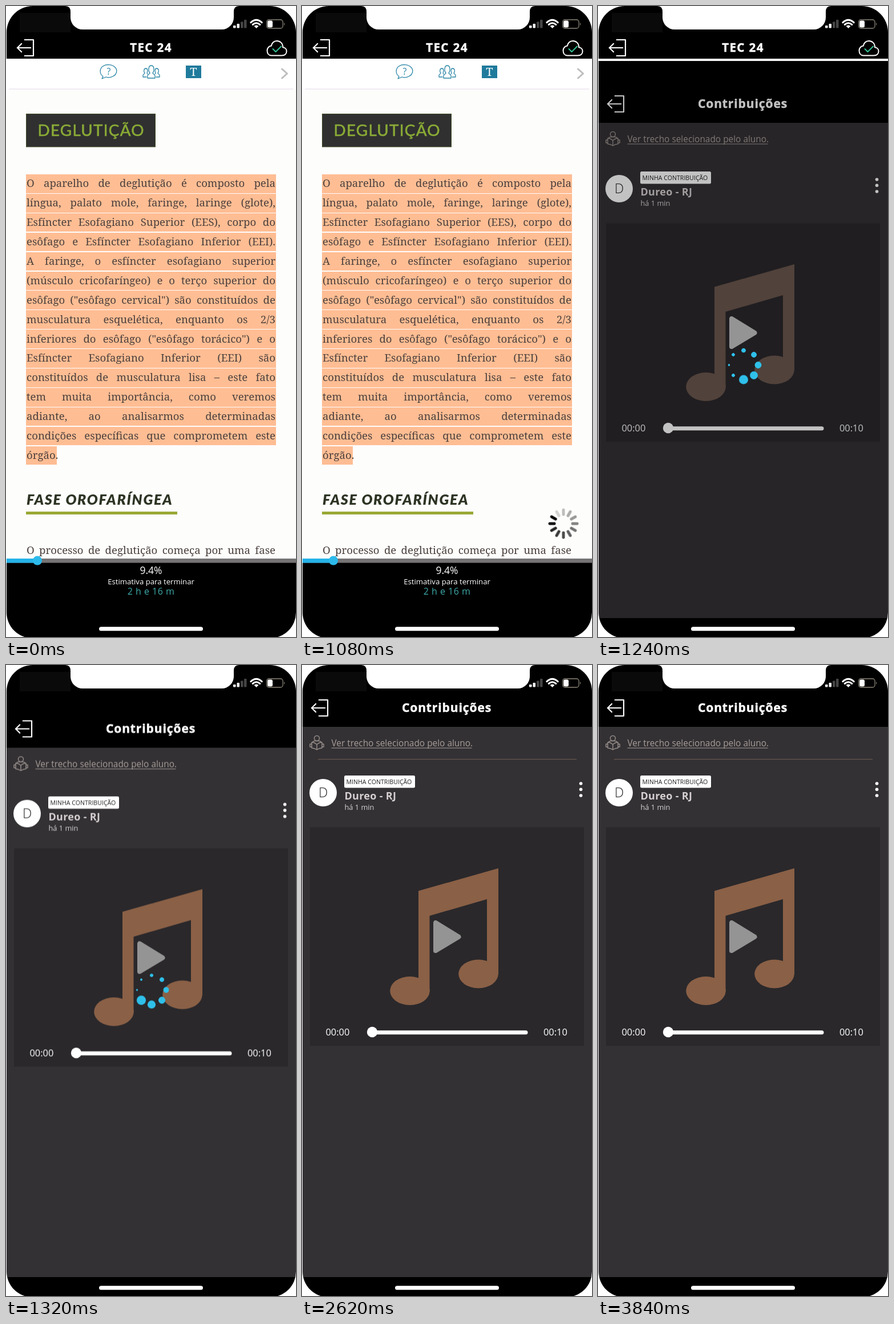
An HTML page for the animation above (3.86 s loop, 508 by 1102 pixels).

```html
<!DOCTYPE html>
<html lang="pt">
<head>
<meta charset="utf-8">
<title>Contribuições</title>
<style>
html, body { margin: 0; width: 100%; height: 100%; overflow: hidden; background: #fff; }
#stage { position: relative; width: 508px; height: 1102px; overflow: hidden; }
svg { position: absolute; left: 0; top: 0; font-family: "Open Sans", "Noto Sans", sans-serif; }
.mid { text-anchor: middle; }
.bold { font-weight: 700; }
.title { font-weight: 700; fill: #fff; stroke: #fff; stroke-width: .5; }
.lato { font-family: Lato, sans-serif; }
.line { fill: none; stroke-linecap: round; stroke-linejoin: round; }

#page { position: absolute; left: 0; top: 0; width: 508px; height: 965px; overflow: hidden; }
.row { position: absolute; left: 36px; width: 436px; height: 34px; line-height: 34px; white-space: nowrap;
  font-family: "Noto Serif", serif; font-size: 18.6px; color: #4b413e; text-align: justify; text-align-last: justify; }
.row.last { text-align-last: left; }
.mark { position: absolute; left: 35px; width: 438px; height: 32.7px; background: #ffbd93; }
.mark.last { width: 54px; }

#clip { position: absolute; left: 0; top: 0; width: 508px; height: 1069px; overflow: hidden; }
#panel { position: absolute; left: 0; top: 0; width: 508px; height: 1102px; animation: slide 3.86s infinite; }
#dim { animation: dim 3.86s linear infinite; }
#note { animation: tint 3.86s linear infinite; }
#rule { animation: rule 3.86s step-end infinite; }
#loader { animation: loader 3.86s step-end infinite; }
#wait { animation: wait 3.86s step-end infinite; }
.dot { animation: shrink .772s linear infinite; }
.spoke { animation: fade .965s steps(12) infinite; }

/* The panel moves in 20 ms steps. */
@keyframes slide {
  0%, 28.49% { transform: translateY(1102px); animation-timing-function: steps(3); }
  30.04% { transform: translateY(254px); animation-timing-function: steps(4); }
  32.12% { transform: translateY(96px); animation-timing-function: steps(4); }
  34.19% { transform: translateY(36.5px); animation-timing-function: steps(7); }
  37.8%, 100% { transform: none; }
}
@keyframes dim { 0%, 31% { opacity: .42; } 33.7%, 100% { opacity: 0; } }
@keyframes tint { 0%, 31% { fill: #534f52; } 33.7%, 100% { fill: #8a6046; } }
@keyframes rule { 0% { opacity: 0; } 38.3%, 100% { opacity: 1; } }
@keyframes loader { 0% { opacity: 1; } 38.3%, 100% { opacity: 0; } }
@keyframes wait { 0% { opacity: 0; } 10.4%, 100% { opacity: 1; } }
@keyframes shrink { 0%, 100% { transform: scale(1); } 87.5% { transform: scale(.13); } }
@keyframes fade { from { opacity: 1; } to { opacity: .1; } }
</style>
</head>
<body>
<div id="stage">
  <svg width="508" height="1102">
    <defs>
      <g id="exit" class="line" stroke="#fff" stroke-width="2.2">
        <path d="M33 59H48V87H33M43 73H20M27 66L20 73L27 80" stroke-linecap="square"/>
      </g>
    </defs>
    <rect width="508" height="1102" fill="#fdfdfc"/>
    <rect width="508" height="92" fill="#000"/>
    <rect y="92" width="508" height="53" fill="#fff"/>
    <rect x="5" y="144" width="498" height="2" fill="#f1ebf3"/>
    <use href="#exit"/>
    <text class="mid title" x="254" y="80" font-size="20.5" letter-spacing="1.4">TEC 24</text>
    <g class="line" stroke-width="2">
      <path stroke="#fff" d="M465 86.500H483C489 86.500 491.500 83 491.500 79C491.500 75 488.500 72.500 485 72.300C485 65 480 61 474.500 61C469 61 465.500 65 465 69.500C460 70 457.500 74 457.500 78C457.500 83 460.500 86.500 465 86.500Z"/>
      <path stroke="#35c49a" d="M467.500 75L472.500 80L482 70.500"/>
    </g>
    <g class="line" stroke="#2a86a6" stroke-width="1.3">
      <path d="M170 123C163 118 164 109 170 105C176 101 186 102 191 107C196 112 194 120 187 123C183 125 178 125 175 124L168 127Z"/>
      <path d="M248 126V122C248 119 252 119 252 117C249 114 249 104 254.500 104C260 104 260 114 257 117C257 119 261 119 261 122V126Z"/>
      <path d="M246 124H240V121C240 119 243 119 243 117C241 115 241 109 245 109C249 109 248 115 247 117L248 119M263 124H269V121C269 119 266 119 266 117C268 115 268 109 264 109C260 109 261 115 262 117L261 119"/>
    </g>
    <text class="mid" x="180" y="120" font-size="16" fill="#2a86a6">?</text>
    <rect x="315" y="104" width="27" height="22" fill="#1f7a9c"/>
    <text class="mid" x="328.500" y="122" font-size="20" fill="#fff" style="font-family:'Noto Serif',serif">T</text>
    <path class="line" d="M483.500 110L492.500 118L483.500 126" stroke="#bdbdbd" stroke-width="3"/>
    <rect x="35.500" y="188.500" width="226" height="57.500" fill="#303030" stroke="#42502a"/>
    <text class="lato" x="55.500" y="226.500" font-size="27.800" letter-spacing="1.300" fill="#8aab36" stroke="#8aab36" stroke-width=".6">DEGLUTIÇÃO</text>
    <text class="lato" x="36" y="870.500" font-size="25" font-weight="900" font-style="italic" letter-spacing="1.700" fill="#2d3424">FASE OROFARÍNGEA</text>
    <rect x="35" y="883" width="265" height="5" fill="#9aa936"/>
  </svg>

  <div id="page"></div>

  <svg width="508" height="1102">
    <g id="wait"></g>
    <rect y="972" width="508" height="130" fill="#000"/>
    <rect y="965" width="508" height="7.500" fill="#757374"/>
    <rect y="965" width="55" height="7.500" fill="#24b3e8"/>
    <circle cx="55" cy="968.500" r="8" fill="#2cb9ea"/>
    <g class="mid" fill="#fff">
      <text x="254" y="992" font-size="17.500">9.4%</text>
      <text x="254" y="1010" font-size="13.200">Estimativa para terminar</text>
      <text x="254" y="1027.500" font-size="16" letter-spacing=".5" fill="#3fa9aa">2 h e 16 m</text>
    </g>
  </svg>

  <div id="clip">
    <div id="panel">
      <svg width="508" height="1102">
        <rect width="508" height="1102" fill="#333134"/>
        <rect width="508" height="108" fill="#000"/>
        <use href="#exit" x="-3" y="2"/>
        <text class="mid title" x="253.500" y="82" font-size="21" letter-spacing=".9">Contribuições</text>
        <g class="line" stroke="#968d89" stroke-width="1.500">
          <circle cx="26" cy="128" r="4.500"/>
          <path d="M26 139C23 136 20 135 17 135V145C20 145 23 146 26 148C29 146 32 145 35 145V135C32 135 29 136 26 139V148M17 138H14V143H17M35 138H38V143H35M19 134C21 132 31 132 33 134"/>
        </g>
        <text x="51.500" y="142" font-size="15.400" fill="#a99e99">Ver trecho selecionado pelo aluno.</text>
        <rect x="51.500" y="144.500" width="246" height="1" fill="#a99e99"/>
        <rect id="rule" x="28" y="164" width="453" height="1.200" fill="#69574d"/>
        <circle cx="37" cy="223" r="24" fill="#fff"/>
        <text class="mid" x="37" y="231" font-size="23" font-weight="300" fill="#222">D</text>
        <rect x="74" y="193" width="124" height="21.500" rx="2.500" fill="#fff"/>
        <text x="77.500" y="208" font-size="10.600" fill="#222">MINHA CONTRIBUIÇÃO</text>
        <text class="bold" x="74.500" y="235" font-size="18" letter-spacing=".3" fill="#d6d0d2">Dureo - RJ</text>
        <text x="74.500" y="253" font-size="12.800" fill="#d6d2d3">há 1 min</text>
        <g fill="#fff">
          <circle cx="488.500" cy="207" r="2.800"/><circle cx="488.500" cy="217.300" r="2.800"/><circle cx="488.500" cy="228" r="2.800"/>
        </g>
        <rect x="14" y="283.500" width="480" height="381.500" fill="#2a282b"/>
        <g id="note">
          <path d="M204 394.500L344 355V540H324V409L223.500 438V570H204Z"/>
          <ellipse cx="189" cy="569" rx="34.800" ry="25"/>
          <ellipse cx="309" cy="539.500" rx="34.800" ry="25"/>
        </g>
        <g fill="#fff" font-size="16.400">
          <text x="41.500" y="647">00:00</text>
          <text x="423" y="647">00:10</text>
          <rect x="118" y="638.300" width="277.500" height="7" rx="3.500"/>
          <circle cx="123" cy="641" r="9.200"/>
        </g>
        <rect id="dim" width="508" height="1102"/>
        <path d="M234 450V499L274.500 474.700Z" fill="#949494" stroke="#949494" stroke-width="8" stroke-linejoin="round"/>
        <g id="loader" fill="#2fc0ea"></g>
      </svg>
    </div>
  </div>

  <svg width="508" height="1102">
    <rect y="1069" width="508" height="33"/>
    <rect x="163" y="1084.300" width="182" height="7" rx="3.500" fill="#fff"/>
    <rect x="24" y="12" width="89" height="34" fill="#0a0a0a"/>
    <g fill="#fff">
      <rect x="398" y="34" width="4.500" height="4.500" rx="1"/>
      <rect x="404.500" y="31" width="4.500" height="7.500" rx="1"/>
      <rect x="411" y="27.500" width="4.500" height="11" rx="1" fill="#464446"/>
      <rect x="417" y="24" width="4.500" height="14.500" rx="1" fill="#464446"/>
      <path d="M438.500 39L434.500 35Q438.500 32 442.500 35Z"/>
      <rect x="458" y="25.500" width="9" height="12" rx="2.500"/>
    </g>
    <g class="line" stroke="#fff" stroke-width="3" stroke-linecap="butt">
      <path d="M432.200 32.500Q438.500 27 444.800 32.500M428.800 28.800Q438.500 20 448.200 28.800"/>
    </g>
    <rect x="456.500" y="24" width="28.500" height="15" rx="4" fill="none" stroke="#8a8578" stroke-width="1.300"/>
    <path d="M487 29Q489.500 31.500 487 34Z" fill="#8a8578"/>
    <path fill="#fff" d="M104 0Q113 0 113 10V20A21 21 0 0 0 134 41H378A21 21 0 0 0 399 20V10Q399 0 408 0Z"/>
    <path fill="#fff" fill-rule="evenodd" d="M0 0H508V1102H0ZM47 0A46 46 0 0 0 1 46V1059A45 45 0 0 0 46 1104H463A45 45 0 0 0 508 1059V46A46 46 0 0 0 462 0Z"/>
  </svg>
</div>
<script>
const rows = `O aparelho de deglutição é composto pela
língua, palato mole, faringe, laringe (glote),
Esfíncter Esofagiano Superior (EES), corpo do
esôfago e Esfíncter Esofagiano Inferior (EEI).
A faringe, o esfíncter esofagiano superior
(músculo cricofaríngeo) e o terço superior do
esôfago ("esôfago cervical") são constituídos de
musculatura esquelética, enquanto os 2/3
inferiores do esôfago ("esôfago torácico") e o
Esfíncter Esofagiano Inferior (EEI) são
constituídos de musculatura lisa – este fato
tem muita importância, como veremos
adiante, ao analisarmos determinadas
condições específicas que comprometem este
órgão.`.split("\n");
const pitch = 33.9;

const page = document.getElementById("page");
function addBox(kind, top, text = "") {
  const box = document.createElement("div");
  box.className = kind;
  box.style.top = top + "px";
  box.textContent = text;
  page.append(box);
}
rows.forEach((text, i) => {
  const last = i === rows.length - 1 ? " last" : "";
  addBox("mark" + last, 294 + i * pitch);
  addBox("row" + last, 292.3 + i * pitch, text);
});
addBox("row", 933.3, "O processo de deglutição começa por uma fase");

function addShape(parent, tag, attrs) {
  const el = document.createElementNS("http://www.w3.org/2000/svg", tag);
  for (const key in attrs) el.setAttribute(key, attrs[key]);
  document.getElementById(parent).append(el);
}
// Negative delays set each part's place in the turning cycle.
for (let i = 0; i < 8; i++) {
  const a = i * Math.PI / 4;
  const x = 255 + 25.5 * Math.sin(a), y = 531 - 25.5 * Math.cos(a);
  addShape("loader", "circle", {
    class: "dot", cx: x, cy: y, r: 8.2,
    style: `transform-origin:${x}px ${y}px;animation-delay:${-714 + 96.5 * i}ms`
  });
}
for (let i = 0; i < 12; i++) {
  addShape("wait", "rect", {
    class: "spoke", x: 455.5, y: 877.5, width: 5, height: 13, rx: 2.5,
    transform: `rotate(${i * 30} 458 904)`,
    style: `animation-delay:${-1694 + 80.4 * i}ms`
  });
}
</script>
</body>
</html>
```
